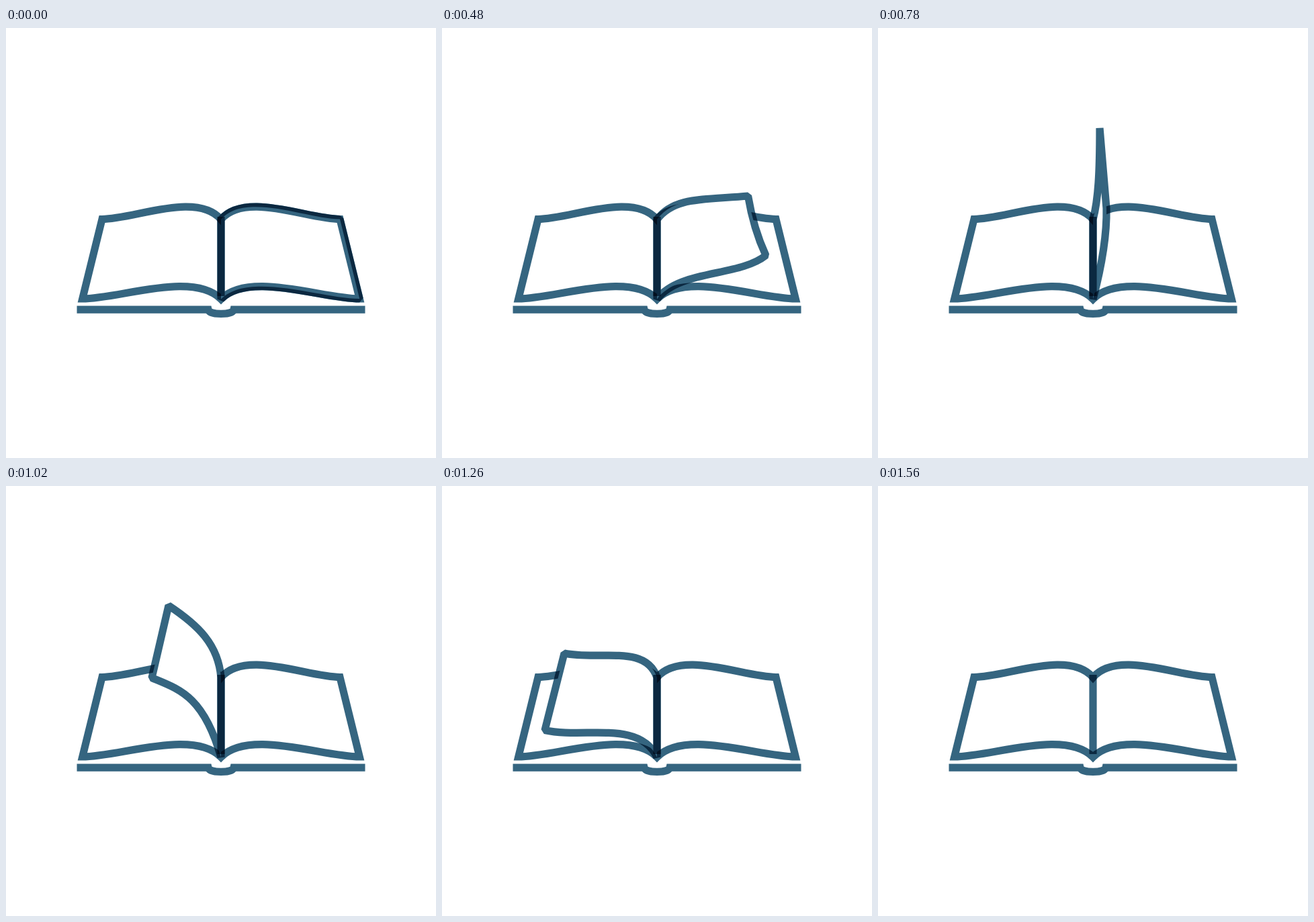
An HTML page with a canvas for the animation above (1680 ms loop, 640 px wide and 640 px high).

```html
<!DOCTYPE html>
<html lang="en">
<head>
<meta charset="utf-8">
<title>Turning page</title>
<style>
  html, body { margin: 0; height: 100%; overflow: hidden; background: #fff; }
  canvas { display: block; }
</style>
</head>
<body>
<canvas id="stage" width="640" height="640"></canvas>
<script>
const ctx = document.getElementById('stage').getContext('2d');
const LOOP = 1680, STEP = 30, START = 165, LANDED = 1560;
const HEAD = 285, FOOT = 403.5; // heights of the two ends of the spine

// An edge is one cubic leaving the spine: two handles and the page corner.
const scaleX = (edge, k) => edge.map(([x, y]) => [x * k, y]);
const restHead = [[36, -42], [129, -0.5], [177, -0.5]];
const right = [restHead, scaleX(restHead, 1.165)];
const left = right.map(edge => scaleX(edge, -1));

// Time, head edge and foot edge of the turning page.
const poses = [
  [START, right],
  [480, [[[25, -33], [65, -29], [135.5, -35]], [[33, -44], [122, -33], [162, -65]]]],
  [780, [[[8, -30], [10, -70], [10, -136]], [[10, -38], [21, -88], [20, -135]]]],
  [1020, [[[-4, -49], [-34, -78], [-78, -107]], [[-26, -91], [-62, -101], [-103, -118]]]],
  [1260, [[[-17, -50], [-85, -25], [-138, -36]], [[-27, -56], [-108, -27], [-167, -40]]]],
  [LANDED, left],
];

// Smooth curve through the poses, at rest at both ends.
function poseAt(t) {
  if (t <= START) return right;
  const k = poses.findIndex(([time]) => time > t) - 1;
  const [t0, from] = poses[k], [t1, to] = poses[k + 1];
  const span = t1 - t0, u = (t - t0) / span, v = 1 - u;
  const speed = (i, e, n, axis) => {
    const a = poses[i - 1], b = poses[i + 1];
    return a && b ? (b[1][e][n][axis] - a[1][e][n][axis]) / (b[0] - a[0]) : 0;
  };
  return from.map((edge, e) => edge.map((point, n) => point.map((value, axis) =>
    value * (1 + 2 * u) * v * v + to[e][n][axis] * (1 + 2 * v) * u * u +
    span * u * v * (v * speed(k, e, n, axis) - u * speed(k + 1, e, n, axis)))));
}

// Runs out along one edge, down the page side and back along the other edge.
function addPage(path, y0, out, y1, back, bend = 0) {
  const [a, b, c] = out.map(([x, y]) => [320 + x, y0 + y]);
  const [d, e, f] = back.map(([x, y]) => [320 + x, y1 + y]);
  path.bezierCurveTo(...a, ...b, ...c);
  path.quadraticCurveTo((c[0] + f[0]) / 2 - bend, (c[1] + f[1]) / 2 + bend, ...f);
  path.bezierCurveTo(...e, ...d, 320, y1);
}

function pageAt(t) {
  const [head, foot] = poseAt(t), path = new Path2D(`M320 ${HEAD}`);
  const lift = Math.min(1, Math.max(0, (t - START) / 600));
  addPage(path, HEAD, head, FOOT, foot, 5 * Math.sin(Math.PI * lift));
  path.closePath();
  return path;
}

const cover = new Path2D(`M320 ${HEAD}`);
addPage(cover, HEAD, right[0], FOOT, right[1]);
addPage(cover, FOOT, left[1], HEAD, left[0]);
cover.closePath();
const spine = new Path2D('M320 281V399');
const base = new Path2D('M105.5 419.2H301C302 423.5 310 425.4 320 425.4S338 423.5 339 419.2H534.5');

function ink(path, join = 'miter') {
  ctx.globalCompositeOperation = 'multiply';
  ctx.lineJoin = join;
  ctx.stroke(path);
  ctx.globalCompositeOperation = 'source-over';
}

function draw(now) {
  const t = Math.floor(now % LOOP / STEP) * STEP;
  const page = t < LANDED && pageAt(t);
  ctx.fillStyle = '#fff';
  ctx.strokeStyle = '#356580';
  ctx.lineWidth = 11.2;
  ctx.fillRect(0, 0, 640, 640);
  ink(cover);
  ink(base);
  if (page) ctx.fill(page); // the page hides what lies under it
  ink(spine);
  if (page) ink(page, 'bevel');
}

const begin = performance.now();
function tick() {
  draw(performance.now() - begin);
  requestAnimationFrame(tick);
}
tick();
</script>
</body>
</html>
```
